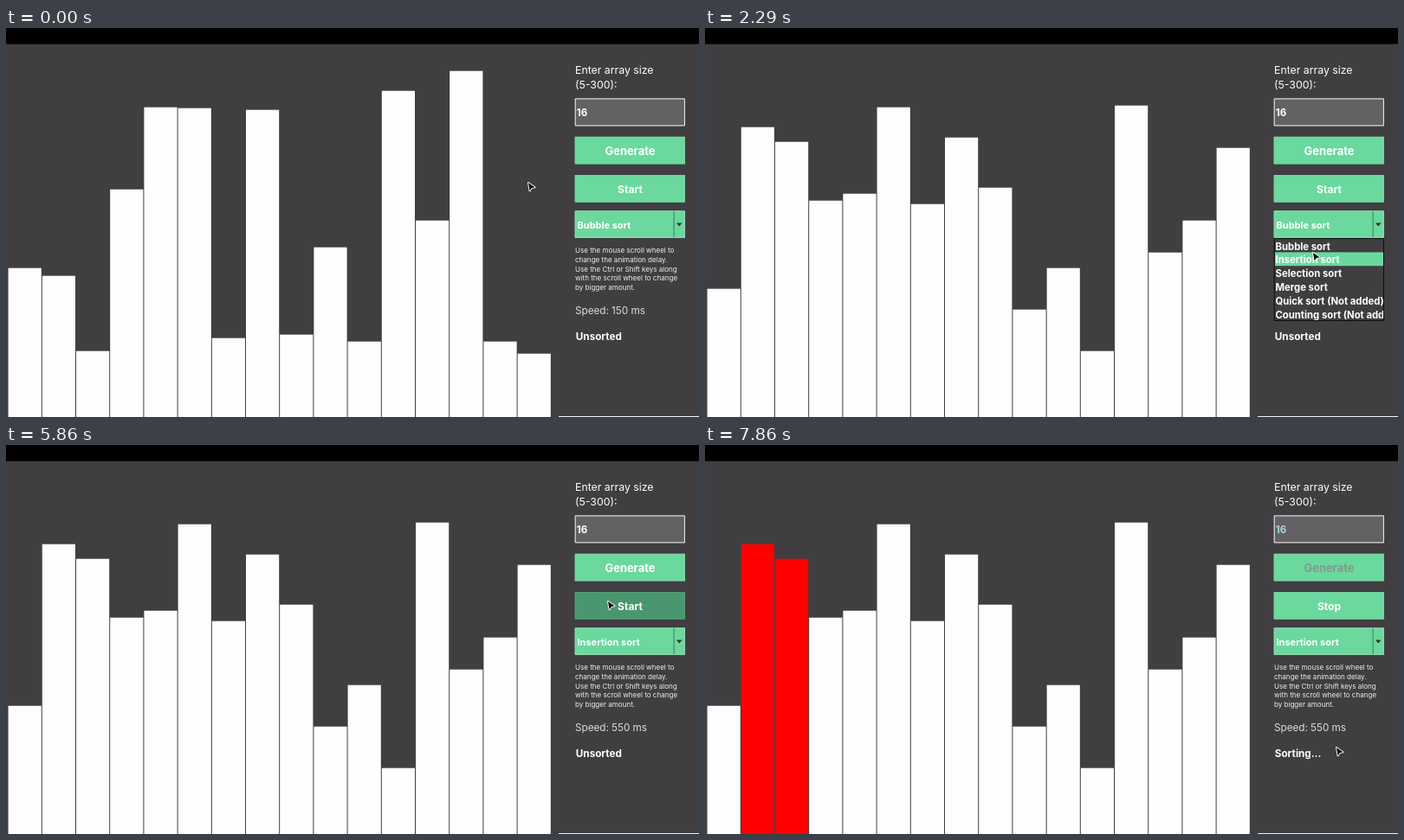
Write an HTML page with a canvas that moves like this. It is 800 by 450 pixels and loops after 8 s.

```html
<!DOCTYPE html>
<html lang="en">
<head>
<meta charset="utf-8">
<title>Sorting visualizer</title>
<style>
html, body { margin: 0; width: 100%; height: 100%; overflow: hidden; background: #403e40; }
canvas { display: block; }
</style>
</head>
<body>
<canvas id="stage" width="800" height="450"></canvas>
<script>
const ctx = document.getElementById('stage').getContext('2d');
const LOOP = 8000, STEP = 1000 / 7;
const BG = '#403e40', GREEN = '#6bd89e', GREEN_DARK = '#4a976f', WHITE = '#fffdff';
const PANEL_X = 656.7, PANEL_W = 127.2, ROW = 15.8, POPUP_Y = 243;

// Moments of the session, counted in screen refreshes (seven per second).
const GENERATE = 7, READY = 9, OPEN = 13, PICK = 18, START = 47;
const SORT_DELAY = 4, GLIDE = 3;

// The two arrays to be sorted, as bar heights.
const before = [172, 163, 76, 263, 358, 357, 91, 355, 95, 196, 87, 377, 227, 400, 87, 73];
const after = [148, 335, 318, 250, 258, 358, 246, 323, 265, 124, 172, 76, 360, 190, 227, 311];

const sorts = ['Bubble sort', 'Insertion sort', 'Selection sort', 'Merge sort',
  'Quick sort (Not added)', 'Counting sort (Not added)'];
const help = ['Use the mouse scroll wheel to', 'change the animation delay.',
  'Use the Ctrl or Shift keys along', 'with the scroll wheel to change', 'by bigger amount.'];

// Where the pointer heads, and when it sets off.
const rest = { x: 603, y: 179 };
const moves = [
  { at: 2, x: 708, y: 138 },
  { at: READY, x: 738, y: 228 },
  { at: OPEN, x: 702, y: 260 },
  { at: 21, x: 565, y: 282 },
  { at: 38, x: 695, y: 181 },
  { at: START, x: 727, y: 341 },
  { at: 51, x: 729, y: 350 }
];

const clamp = (v, min, max) => Math.min(max, Math.max(min, v));
const smooth = u => u * u * (3 - 2 * u);

function pointerAt(n) {
  return moves.reduce((p, move) => {
    const e = smooth(clamp((n - move.at) / GLIDE, 0, 1));
    return { x: p.x + (move.x - p.x) * e, y: p.y + (move.y - p.y) * e };
  }, rest);
}

// Two turns of the wheel, four notches each, one notch per refresh.
function speedAt(n) {
  const notches = from => clamp(n - from + 1, 0, 4);
  return 150 + 50 * (notches(28) + notches(33));
}

function rect(x, y, w, h, fill, border) {
  ctx.fillStyle = fill;
  ctx.fillRect(x, y, w, h);
  if (!border) return;
  ctx.strokeStyle = border;
  ctx.lineWidth = 1;
  ctx.strokeRect(x + .5, y + .5, w - 1, h - 1);
}

function polygon(...points) {
  ctx.beginPath();
  points.forEach(([x, y]) => ctx.lineTo(x, y));
  ctx.closePath();
}

function text(str, x, y, size, weight = 400, color = '#fff', align = 'left') {
  ctx.font = `${weight} ${size}px Inter, "Open Sans", sans-serif`;
  ctx.textAlign = align;
  ctx.fillStyle = color;
  ctx.fillText(str, x, y);
}

function button(label, y, pointer, size, color) {
  const hover = pointer.x > PANEL_X && pointer.x < PANEL_X + PANEL_W &&
    pointer.y > y && pointer.y < y + 31.6;
  rect(PANEL_X, y, PANEL_W, 31.6, hover ? GREEN_DARK : GREEN, hover ? '#559f7a' : '#78d6a4');
  text(label, 720.5, y + 21.2, size, 700, color, 'center');
}

// Insertion sort: each key lights up blue, then the pair being swapped turns red.
function barColor(i, n) {
  const phase = Math.floor((n - START) / SORT_DELAY);
  if (phase < 0) return WHITE;
  if (phase < 2) return i === phase + 1 ? '#4aa6d3' : WHITE;
  return i === 1 || i === 2 ? '#f00' : WHITE;
}

function bars(n) {
  (n < GENERATE ? before : after).forEach((height, i) =>
    rect(2.6 + i * 39.2, 449.7 - height, 38.2, height + 1, barColor(i, n)));
}

function combo(label) {
  rect(PANEL_X, 211.4, PANEL_W, 31.4, GREEN, '#9ad6b6');
  rect(770.6, 212, 1, 30, '#3f7d5d');
  ctx.fillStyle = '#26362e';
  polygon([774, 225.5], [780.5, 225.5], [777.2, 229.5]);
  ctx.fill();
  text(label, 659.5, 231.5, 11, 700);
}

function popup(pointer) {
  const active = clamp(Math.floor((pointer.y - POPUP_Y) / ROW), 0, sorts.length - 1);
  rect(PANEL_X, POPUP_Y, PANEL_W, 96, BG, '#0c0c0c');
  ctx.save();
  ctx.beginPath();
  ctx.rect(658, POPUP_Y + 1, 125, 94);
  ctx.clip();
  sorts.forEach((name, i) => {
    const y = POPUP_Y + .6 + i * ROW;
    if (i === active) rect(658, y, 125, ROW, GREEN);
    text(name, 658.5, y + 12.9, 11.3, 700);
  });
  ctx.restore();
}

function drawPointer({ x, y }) {
  polygon([x, y], [x + 7.5, y + 5.2], [x + 3.8, y + 6], [x + 1.6, y + 9.3]);
  ctx.lineJoin = 'round';
  ctx.lineWidth = 2;
  ctx.strokeStyle = '#f4f4f4';
  ctx.stroke();
  ctx.fillStyle = '#060606';
  ctx.fill();
}

function draw(n) {
  const pointer = pointerAt(n);
  const sorting = n >= START;
  const disabled = sorting || (n >= GENERATE && n < READY);

  rect(0, 0, 800, 450, BG);
  rect(0, 0, 800, 18.6, '#000');
  bars(n);
  rect(638, 449, 162, 1, '#f4f2f4');

  text('Enter array size', 657, 53, 12.3);
  text('(5-300):', 657, 70, 12.3);
  rect(PANEL_X, 81.4, PANEL_W, 32, '#636163', '#f2f2f2');
  text('16', 658.8, 102, 11.5, 700, disabled ? '#a5d5e6' : '#fff');
  button('Generate', 125.8, pointer, 12.9, disabled ? '#85968c' : '#fff');
  button(sorting ? 'Stop' : 'Start', 170, pointer, 12, '#fff');
  combo(sorts[n < PICK ? 0 : 1]);

  help.forEach((line, i) => text(line, 657, 260 + i * 10.75, 8.05, 400, '#eee'));
  text(`Speed: ${speedAt(n)} ms`, 657, 330.5, 11.7, 400, '#deddde');
  text(sorting ? 'Sorting...' : 'Unsorted', 657.8, 361, 11.7, 700);

  if (n >= OPEN && n < PICK) popup(pointer);
  drawPointer(pointer);
}

function tick() {
  const now = performance.now() % LOOP;
  draw(Math.floor((now + 5) / STEP));
  requestAnimationFrame(tick);
}
tick();
</script>
</body>
</html>
```
